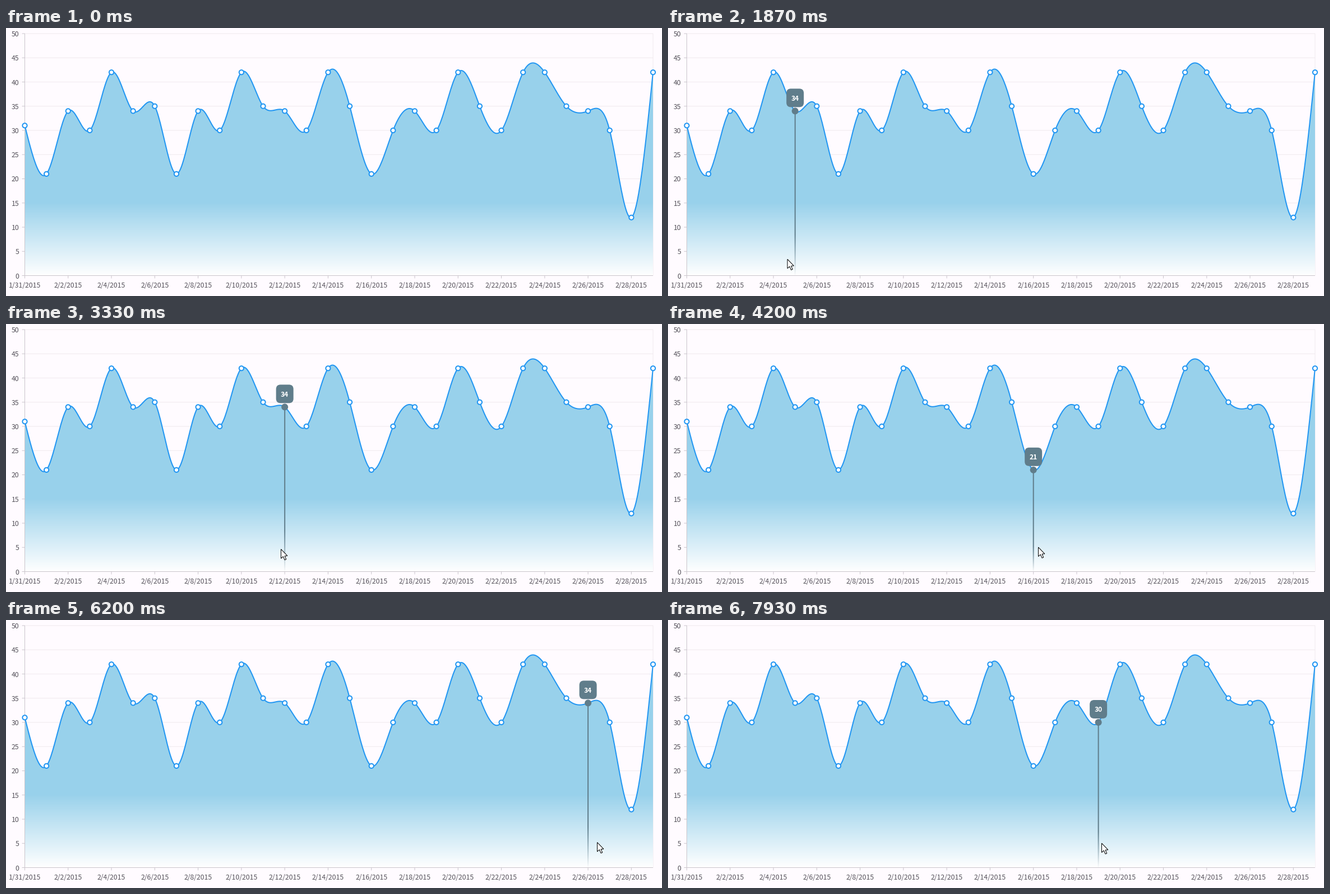
Recreate the animation shown at these times as a matplotlib script. Size 1170 by 479 pixels, loop 8000 ms.

```python
import numpy as np
import matplotlib.pyplot as plt
from matplotlib.animation import FuncAnimation
from matplotlib.collections import LineCollection
from matplotlib.colors import to_rgb
from matplotlib.patches import Circle, FancyBboxPatch, Polygon

W, H, DPI = 1170, 479, 64
STEPS, LOOP_MS = 120, 8000
FRAMES = 2 * STEPS
PX = 72 / DPI  # one pixel in points

LEFT, RIGHT, TOP, BOTTOM = 33.5, 1154.0, 10.0, 442.5
FADE_TOP = 311
FONT = "Noto Sans CJK JP"
BACK, GRID, AXIS, INK = "#fffbff", "#f0eaef", "#cac5cc", "#55525a"
BLUE, SLATE, SKY = "#2196f3", "#607d8b", "#98d1eb"

# Daily readings
VALUES = np.array([31, 21, 34, 30, 42, 34, 35, 21, 34, 30,
                   42, 35, 34, 30, 42, 35, 21, 30, 34, 30,
                   42, 35, 30, 42, 42, 35, 34, 30, 12, 42])
N = len(VALUES)
GAP = (RIGHT - LEFT) / (N - 1)

# Pointer turns: step, x, y
TURNS = np.array([
    (6, 110, 472), (9, 103, 446), (11, 103, 446), (20, 93, 418),
    (36, 332, 407.5), (50, 490, 402), (63, 660, 398.5), (75, 877, 398),
    (93, 1054, 397), (94, 1062, 397), (97, 1062, 397), (110, 910, 398),
    (119, 773, 398.5)])
START = TURNS[0, 0]
ARROW = np.array([(0, 0), (0, 16.5), (3.8, 13), (6.6, 19.2), (9.2, 18.1),
                  (6.6, 12.1), (11.4, 11.8)])


def px_x(i):
    return LEFT + GAP * i


def px_y(v):
    return BOTTOM - (BOTTOM - TOP) * v / 50


def natural_spline(v, per=24):
    """Natural cubic spline through evenly spaced values."""
    n = len(v)
    a = 4 * np.eye(n) + np.eye(n, k=1) + np.eye(n, k=-1)
    a[0, 0] = a[-1, -1] = 2
    rhs = 3 * np.r_[v[1] - v[0], v[2:] - v[:-2], v[-1] - v[-2]]
    m = np.linalg.solve(a, rhs)
    u = np.linspace(0, n - 1, (n - 1) * per + 1)
    i = np.minimum(u.astype(int), n - 2)
    t = u - i
    y = ((1 + 2 * t) * (1 - t) ** 2 * v[i] + t * (1 - t) ** 2 * m[i]
         + t * t * (3 - 2 * t) * v[i + 1] + t * t * (t - 1) * m[i + 1])
    return u, y


fig = plt.figure(figsize=(W / DPI, H / DPI), dpi=DPI, facecolor=BACK)
ax = fig.add_axes([0, 0, 1, 1])


def rules(segments, color, z):
    ax.add_collection(LineCollection(segments, colors=color, linewidths=PX,
                                     zorder=z, snap=False), autolim=False)


def label(x, y, s, **kw):
    style = dict(family=FONT, fontsize=12.2 * PX, color=INK, va="baseline")
    return ax.text(x, y, s, **{**style, **kw})


def draw_axes():
    grid = [[(RIGHT, TOP), (RIGHT, BOTTOM)]]
    axis = [[(LEFT, TOP), (LEFT, BOTTOM)], [(LEFT, BOTTOM), (RIGHT, BOTTOM)]]
    for v in range(0, 51, 5):
        y = px_y(v)
        grid.append([(LEFT, y), (RIGHT, y)])
        axis.append([(LEFT - 5, y), (LEFT, y)])
        label(23.5, y + 5, str(v), ha="right")
    for i in range(0, N, 2):
        x = px_x(i)
        axis.append([(x, BOTTOM), (x, BOTTOM + 5)])
        day = f"2/{i}" if i else "1/31"
        label(x, 464.5, f"{day}/2015", ha="center")
    rules(grid, GRID, 1)
    rules(axis, AXIS, 4)


def draw_series():
    u, v = natural_spline(VALUES)
    x, y = px_x(u), px_y(v)
    edge = np.c_[np.r_[x, RIGHT, LEFT], np.r_[y, BOTTOM, BOTTOM]]
    clip = ax.add_patch(Polygon(edge, fc="none", ec="none"))
    sky, white = np.array(to_rgb(SKY)), np.ones(3)
    rows = np.arange(H) + 0.5
    t = np.clip((rows - FADE_TOP) / (BOTTOM - FADE_TOP), 0, 1)[:, None]
    shade = (sky + (white - sky) * t)[:, None, :]
    area = ax.imshow(shade, extent=(0, W, H, 0), aspect="auto",
                     interpolation="nearest", zorder=2)
    area.set_clip_path(clip)
    ax.plot(x, y, color=BLUE, lw=2 * PX, zorder=5, solid_joinstyle="round")
    for i, val in enumerate(VALUES):
        ax.add_patch(Circle((px_x(i), px_y(val)), 4.1, fc="white", ec=BLUE,
                            lw=2 * PX, zorder=6))


draw_axes()
draw_series()
ax.set(xlim=(0, W), ylim=(H, 0))
ax.axis("off")

stem = LineCollection([], linewidths=2 * PX, zorder=7, snap=False)
ax.add_collection(stem, autolim=False)
dot = ax.add_patch(Circle((0, 0), 6, fc=SLATE, ec="none", zorder=8))
box = ax.add_patch(FancyBboxPatch(
    (0, 0), 31, 33, boxstyle="round,pad=0,rounding_size=8",
    fc=SLATE, ec="none", zorder=8))
tip = label(0, 0, "", ha="center", color="white", weight="bold",
            fontsize=12 * PX, zorder=9)
tracker = (stem, dot, box, tip)
pointer = ax.add_patch(Polygon(ARROW, fc="white", ec="black", lw=PX,
                               joinstyle="miter", zorder=10))


def place_tracker(i):
    x, y = px_x(i), px_y(VALUES[i])
    ys = np.arange(int(y), int(BOTTOM))
    stem.set_segments([[(x, a), (x, a + 1)] for a in ys])
    # the last quarter of the stem fades out
    alpha = np.clip((BOTTOM - ys) / (0.25 * (BOTTOM - y)), 0, 1)
    stem.set_color([(*to_rgb(SLATE), a) for a in alpha])
    dot.center = x, y
    box.set_bounds(x - 15.5, y - 40, 31, 33)
    tip.set_position((x, y - 18.9))
    tip.set_text(str(VALUES[i]))


def update(frame):
    # two frames per step, so a step begins half a step early
    step = min((frame + 1) // 2, STEPS - 1)
    x, y = (np.interp(step, TURNS[:, 0], TURNS[:, c]) for c in (1, 2))
    pointer.set_visible(step >= START)
    pointer.set_xy(ARROW + (x + 0.5, y + 0.5))
    inside = step >= START and y < BOTTOM
    for part in tracker:
        part.set_visible(inside)
    if inside:
        place_tracker(int(round((x - 2 - LEFT) / GAP)))
    return (*tracker, pointer)


anim = FuncAnimation(fig, update, frames=FRAMES, interval=LOOP_MS / FRAMES,
                     init_func=lambda: update(0), repeat=True,
                     repeat_delay=0, blit=False)
plt.show()
```
